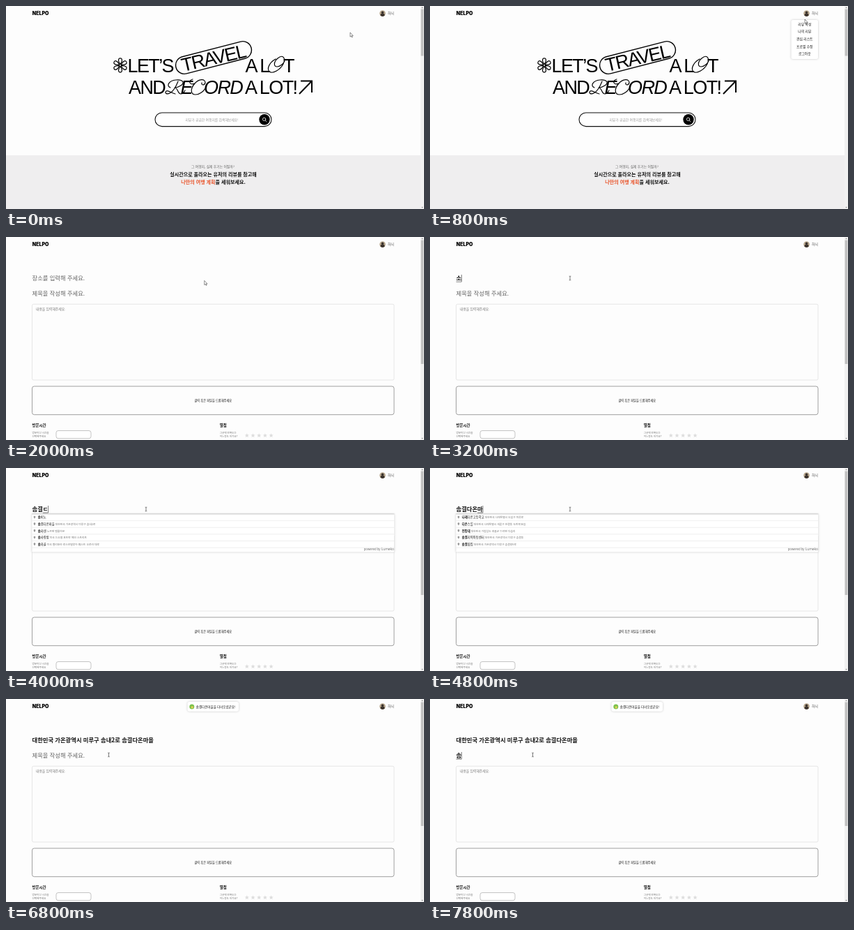
Write an HTML page that moves like this. It is 600x291 px and loops after 8000 ms.

```html
<!DOCTYPE html>
<html lang="ko">
<head>
<meta charset="utf-8">
<title>여행 리뷰</title>
<style>
html, body { margin: 0; width: 100%; height: 100%; overflow: hidden; background: #fdfdfd; }
svg { display: block; width: 100vw; height: 100vh; }
text { font-family: "Noto Sans CJK KR", "Noto Sans CJK", sans-serif; fill: #111; white-space: pre; }
.mid { text-anchor: middle; }
.b { font-weight: 700; }
.head { font: 27px "Liberation Sans", Arial, sans-serif; letter-spacing: -1.6px; fill: #000; }
.it { font-style: italic; }
.line { fill: none; stroke: #000; stroke-linecap: round; stroke-linejoin: round; }
.s35 { font-size: 3.6px; fill: #777; }
.s48 { font-size: 4.8px; }
.s54 { font-size: 5.4px; font-weight: 700; }
.s70 { font-size: 7.05px; font-weight: 700; }
.s83 { font-size: 8.3px; font-weight: 700; }
.hint { fill: #666; font-weight: 500; }
.addr { font-size: 3.8px; fill: #777; font-weight: 400; }
.latin { font-family: "Open Sans", sans-serif; }
.pop { filter: drop-shadow(0 .8px 1.4px rgba(0,0,0,.22)); }
</style>
</head>
<body>
<svg viewBox="0 0 600 291" preserveAspectRatio="none">
  <defs>
    <path id="petal" d="M0 -1.4C-1.2 -3.2 -2.9 -5.6 -2.4 -8.2C-2 -10.8 2 -10.8 2.4 -8.2C2.9 -5.6 1.2 -3.2 0 -1.4Z"/>
    <path id="star" d="M0 -3.2L.9 -1.1L3.1 -1L1.4 .5L2 2.7L0 1.5L-2 2.7L-1.4 .5L-3.1 -1L-.9 -1.1Z"/>
    <path id="pin" d="M0 2C-.9 .6 -1.4 0 -1.4 -.7A1.4 1.4 0 0 1 1.4 -.7C1.4 0 .9 .6 0 2Z"/>
  </defs>
  <rect width="600" height="291" fill="#fdfdfd"/>

  <g id="home">
    <rect y="214" width="595" height="77" fill="#efeeef"/>
    <g id="flower" class="line" stroke-width="1.2" transform="translate(164 85)"></g>
    <text class="head" x="174.5" y="95">LET’S</text>
    <text class="head" x="343.5" y="95">A L</text>
    <text class="head" x="398" y="95">T</text>
    <text class="head" x="176" y="126">AND</text>
    <text class="head it" x="250.5" y="126">E</text>
    <text class="head it" x="284" y="126">ORD</text>
    <text class="head" x="343" y="126">A LOT!</text>
    <g transform="translate(298 74) rotate(-14.5)">
      <rect class="line" x="-55.8" y="-12.5" width="111.6" height="25" rx="12.5" stroke-width="1.4"/>
      <text class="head mid" x="-.6" y="9.8" transform="rotate(1.5)">TRAVEL</text>
    </g>
    <g class="line" stroke-width="1.2">
      <path d="M387 76c-9 5-13 14-9 18c5 4 16-3 20-11c4-9-1-14-8-8c-6 5-6 12-1 12c4 0 9-4 11-8"/>
      <path d="M247 108c-3 7-6 14-12 17c-4 2-8 0-5-3c3-2 7 3 13 4M236 117c-6-2-3-10 8-11c10-1 13 4 7 8c-3 2-6 3-9 3c5 0 4 9 9 9c3 0 5-3 6-5"/>
      <path d="M286 110c0-6-9-6-15 1c-7 8-6 16 1 16c6 0 12-5 14-9M286 110c-1 4-6 4-5 0M271 111c-8 3-10-4-3-6"/>
    </g>
    <path class="line" style="stroke-linecap:butt;stroke-linejoin:miter" stroke-width="2" d="M421 126L438.5 108M423 107.5H439V124"/>
    <rect x="214" y="153" width="167" height="19.6" rx="9.8" fill="#fff" stroke="#111" stroke-width="1.1"/>
    <text class="mid s48" style="fill:#999" x="295.5" y="164.6">리뷰가 궁금한 여행지를 검색해보세요!</text>
    <circle cx="371" cy="162.8" r="7.7"/>
    <path class="line" style="stroke:#fff" stroke-width=".8" d="M372.4 164.2L374 165.8M372.8 162.3a2.2 2.2 0 1 1 -4.4 0a2.2 2.2 0 0 1 4.4 0"/>
    <text class="mid s48" style="fill:#666" x="297" y="231.5">그 여행지, 실제 후기는 어떨까?</text>
    <text class="mid s70" x="297.5" y="244">실시간으로 올라오는 유저의 리뷰를 참고해</text>
    <text class="mid s70" x="297.5" y="255.3"><tspan fill="#e9562d">나만의 여행 계획</tspan>을 세워보세요.</text>
  </g>

  <g id="write">
    <text id="place" class="s83" x="37.5" y="62"></text>
    <path id="wave" fill="none" stroke="#e0403a" stroke-width=".6"/>
    <path id="mark" fill="none" stroke="#222" stroke-width=".6"/>
    <text id="title" class="s83" x="37.5" y="84"></text>
    <rect x="37.5" y="96.3" width="519.5" height="108.7" rx="2" fill="none" stroke="#ddd" stroke-width=".7"/>
    <text class="s48" style="fill:#777" x="43" y="105.2">내용을 입력해주세요.</text>
    <rect x="37.5" y="214" width="519.5" height="40.7" rx="3" fill="none" stroke="#888" stroke-width=".8"/>
    <text class="mid" font-size="4.2" x="297.3" y="236">클릭 혹은 파일을 드롭해주세요</text>
    <text class="s54" x="37.5" y="272.2">방문시간</text>
    <text class="s54" x="306.7" y="272.2">별점</text>
    <text class="s35" x="37.5" y="281.7">방문하신 시간을</text>
    <text class="s35" x="37.5" y="287.2">선택해주세요</text>
    <text class="s35" x="306.7" y="281.7">그곳에 만족도는</text>
    <text class="s35" x="306.7" y="287.2">어느정도 인가요?</text>
    <rect x="72" y="277.6" width="50" height="11.2" rx="3" fill="#fff" stroke="#aaa" stroke-width=".7"/>
    <g id="stars" fill="#ddd"></g>
    <g id="list">
      <rect class="pop" x="37.3" y="66" width="520" height="54.3" fill="#fff"/>
      <path d="M37 66H557.5" stroke="#bbb" stroke-width=".7"/>
      <rect id="hover" x="37.3" y="66.3" width="520" height="9.2" fill="#f6f6f6"/>
      <g id="rows"></g>
      <text class="latin" text-anchor="end" x="557" y="118.3" font-size="4.4" style="fill:#666">powered by <tspan font-size="4.9">Lumeko</tspan></text>
    </g>
  </g>

  <text x="37.8" y="13.3" style="font:900 7px Inter,sans-serif;fill:#000">NELPO</text>
  <g>
    <circle cx="540.5" cy="10.6" r="4.3" fill="#b9a88f"/>
    <path d="M537.4 13.6a3.1 3.1 0 0 1 6.2 0a4.3 4.3 0 0 1 -6.2 0" fill="#3a322c"/>
    <circle cx="540.5" cy="9.2" r="1.8" fill="#3a322c"/>
  </g>
  <text class="s48" style="fill:#444" x="548" y="12.3">하늬</text>

  <g id="menu">
    <rect class="pop" x="518.5" y="20" width="38.5" height="56" rx="2.5" fill="#fff"/>
    <g id="items"></g>
  </g>
  <g id="toast">
    <rect class="pop" x="260.5" y="4" width="73.5" height="13.8" rx="3" fill="#fff"/>
    <circle cx="266.8" cy="11" r="3.5" fill="#7cc24c"/>
    <circle cx="267.2" cy="11.8" r="1.6" fill="#e8cf58"/>
    <text font-size="4.5" x="272.8" y="12.5">솜결다온마을을 다녀오셨군요!</text>
  </g>
  <g id="status">
    <path d="M0 288H50q1 0 1 1V291H0Z" fill="#35363a"/>
    <text class="latin" x="2" y="291" font-size="2.6" style="fill:#bbb">https://nelpo.example/review/write</text>
  </g>

  <rect x="595" width="5" height="291" fill="#f1f1f1"/>
  <rect id="thumb" x="595.6" y="4.5" width="3.8" fill="#c1c1c1"/>
  <path d="M596.4 3L597.5 1.6L598.6 3ZM596.4 288L597.5 289.4L598.6 288Z" fill="#777"/>
  <path id="arrow" d="M0 0V6.2L1.5 4.9L2.5 7L3.4 6.6L2.4 4.6H4.3Z" fill="#fff" stroke="#222" stroke-width=".5"/>
  <path id="beam" d="M-1.3 -2.8H-.3L0 -2.5L.3 -2.8H1.3M0 -2.5V2.5M-1.3 2.8H-.3L0 2.5L.3 2.8H1.3" fill="none" stroke="#222" stroke-width=".6"/>
</svg>
<script>
const $ = id => document.getElementById(id);
const LOOP = 8000, STEP = 200;
const show = (id, on) => $(id).setAttribute('visibility', on ? 'visible' : 'hidden');
const latest = (steps, t) => steps.filter(s => s[0] <= t).pop();

$('flower').innerHTML = [0, 1, 2, 3, 4, 5].map(i => `<use href="#petal" transform="rotate(${i * 60})"/>`).join('');
$('stars').innerHTML = [0, 1, 2, 3, 4].map(i => `<use href="#star" x="${345.8 + i * 8.7}" y="284.6"/>`).join('');
$('items').innerHTML = ['리뷰 작성', '나의 리뷰', '관심 리스트', '프로필 수정', '로그아웃']
  .map((s, i) => `<text class="mid s48" x="537.8" y="${27.6 + i * 10.65}">${s}</text>`).join('');

// Each suggestion: matched part | rest of the name | address
const city = '대한민국 가온광역시 미루구 ';
const village = '솜결다온마을';
const lists = [
  ['솜|비노|', `솜|결다온마을|${city}솜내2로`, '솜|라덴|노르덴 벨름하븐',
   '솜|사랑방|미국 뉴오델 포트란 메인 스트리트', '솜|자골|미국 벨리포라 로스안델루아 웨스트 오로라 대로'],
  ['나래|다온고등학교|대한민국 나래특별시 도담구 마루로', '다온|스힐|대한민국 나래특별시 새론구 한결동 도란로36길',
   '전망대||대한민국 가람남도 여울군 누리면 다솜리', `솜결|지역아동센터|${city}솜결동`, `솜결|횟집|${city}솜결항9로`],
  [`${village}||${city}솜내2로`, `${village}| 안내센터|${city}솜내2로`, `${village}| 주차장|${city}솜결동`,
   `${village}| 달샘나루전망대|${city}솜결동`, `${village}| 옛날박물관|${city}솜결제2동 솜내2로`]
].map(list => list.map((row, i) => {
  const [hit, rest, addr] = row.split('|'), y = 72.2 + i * 9.65;
  return `<use href="#pin" x="41" y="${y - 1.4}" fill="#999"/>` +
    `<text x="45.7" y="${y}" font-size="4.35"><tspan class="b">${hit}</tspan>${rest}<tspan class="addr"> ${addr}</tspan></text>` +
    `<path d="M37.3 ${y + 3.4}H557.3" stroke="#e4e4e4" stroke-width=".6"/>`;
}).join(''));

const placeHint = '장소를 입력해 주세요.', titleHint = '제목을 작성해 주세요.';
const placeSteps = [[0, ''], [3000, 'ㅅ'], [3200, '소'], [3600, '솜'], [3800, '솜겨'], [4000, '솜결ㄷ'],
  [4200, '솜결다'], [4400, '솜결다오'], [4600, '솜결다온'], [4800, '솜결다온마'], [5000, '솜결다온마으'],
  [5200, village], [6400, `${city}솜내2로 ${village}`]];
const titleSteps = [[0, ''], [7400, 'ㅅ'], [7600, '소'], [7800, '솜']];
const listSteps = [[0, 0], [4400, 1], [5200, 2]];
const path = [[0, 494, 38], [200, 512, 24], [400, 540, 11], [600, 540, 12], [1000, 536, 26], [1200, 536, 26],
  [1600, 368.5, 66], [2400, 201, 59], [5800, 201, 59], [6000, 176, 70], [6200, 155.5, 72], [6400, 155.5, 72],
  [6800, 147.5, 80], [8000, 147.5, 80]];

function cursorAt(t) {
  const i = Math.max(1, path.findIndex(p => p[0] >= t));
  const [t0, x0, y0] = path[i - 1], [t1, x1, y1] = path[i];
  const k = (t - t0) / (t1 - t0);
  return [x0 + (x1 - x0) * k, y0 + (y1 - y0) * k];
}

function field(id, value, hint) {
  $(id).textContent = value || hint;
  $(id).classList.toggle('hint', !value);
  return value ? $(id).getComputedTextLength() : 0;
}

// Underline of the syllable being composed, with the caret beside it
function compose(width, y) {
  const x = 37.5 + width, start = Math.max(37.5, x - 7.6);
  $('mark').setAttribute('d', (width ? `M${start} ${y + 2.2}H${x}` : '') + `M${x + .2} ${y - 8}V${y + 2.2}`);
}

let last = -1;
function draw(t) {
  const onWrite = t >= 2000, open = t >= 3600 && t < 6400;
  show('home', !onWrite);
  $('write').style.display = onWrite ? '' : 'none';
  show('menu', t >= 600 && t < 2000);
  show('status', t >= 1000 && t < 2000);
  $('thumb').setAttribute('height', onWrite ? 177.5 : 67);

  const [x, y] = cursorAt(t);
  const beam = (t >= 2400 && t < 6000) || t >= 6800;
  for (const id of ['arrow', 'beam']) $(id).setAttribute('transform', `translate(${x} ${y})`);
  show('beam', beam);
  show('arrow', !beam);

  const slide = Math.min(1, Math.max(0, (t - 6400) / 400));
  show('toast', slide > 0);
  $('toast').setAttribute('transform', `translate(0 ${-20 * (1 - slide) ** 2})`);
  if (!onWrite) return;

  const placeWidth = field('place', latest(placeSteps, t)[1], placeHint);
  const titleWidth = field('title', latest(titleSteps, t)[1], titleHint);
  show('mark', (t >= 2600 && t < 5800) || t >= 7400);
  if (t < 6400) compose(placeWidth, 62); else compose(titleWidth, 84);

  show('wave', t >= 5800 && t < 6400);
  $('wave').setAttribute('d', 'M37.5 63.8' + 'q.5 -.8 1 0t1 0'.repeat(Math.floor(placeWidth / 2)));
  show('list', open);
  show('hover', open && t >= 6000);
  $('rows').innerHTML = lists[latest(listSteps, t)[1]];
}

function tick() {
  const t = Math.floor(performance.now() % LOOP / STEP) * STEP;
  if (t !== last) draw(last = t);
  requestAnimationFrame(tick);
}
tick();
</script>
</body>
</html>
```
